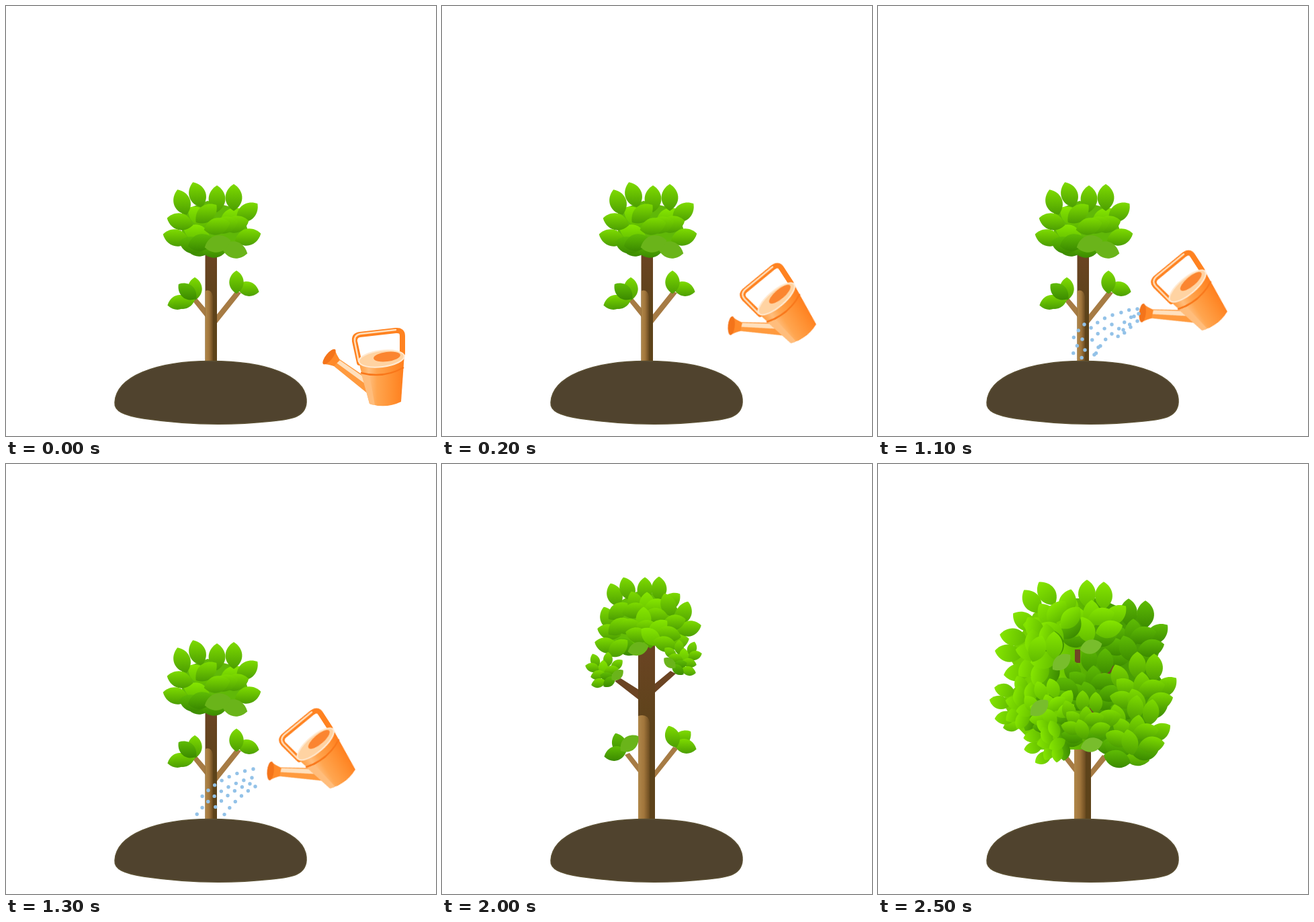
These frames come from a looping animation (640x640 px, 3 s). An HTML page without scripts:

```html
<!DOCTYPE html>
<html lang="en">
<head>
<meta charset="utf-8">
<title>Growing tree</title>
<style>
html,body{margin:0;height:100%;overflow:hidden;background:#fff}
svg{display:block;width:100%;height:100%;--s:1.04}
.leaf{transform:scale(var(--s))}
.g{fill:url(#g)}
.l{fill:url(#l)}
.k{fill:url(#k)}
.f{fill:#6ab41a}
.limb{fill:#a67b44}
.drops{fill:none;stroke:#93c2e8;stroke-width:5.4;stroke-linecap:round;stroke-dasharray:0 12.5}
.can,.show{animation:3s step-end infinite}
.show{opacity:0}
.can{animation-name:can}
.t1{animation-name:t1}
.t2{animation-name:t2}
.t3{animation-name:t3}
.t4{animation-name:t4}
.w1{animation-name:w1}
.w2{animation-name:w2}
.w3{animation-name:w3}
.w4{animation-name:w4}
@keyframes can{
  0%{transform:none;opacity:1}
  6.66%{transform:translate(-257px,300px) rotate(-33deg);opacity:1}
  23.33%{transform:translate(-294px,281px) rotate(-33deg);opacity:1}
  50%,100%{transform:none;opacity:0}
}
@keyframes t1{0%{opacity:1}50%,100%{opacity:0}}
@keyframes t2{0%{opacity:0}50%{opacity:1}66.66%,100%{opacity:0}}
@keyframes t3{0%{opacity:0}66.66%{opacity:1}83.33%,100%{opacity:0}}
@keyframes t4{0%{opacity:0}83.33%,100%{opacity:1}}
@keyframes w1{0%{opacity:0}23.33%{opacity:1}43.33%,100%{opacity:0}}
@keyframes w2{0%{opacity:0}30%{opacity:1}43.33%,100%{opacity:0}}
@keyframes w3{0%{opacity:0}36.66%{opacity:1}43.33%,100%{opacity:0}}
@keyframes w4{0%{opacity:0}43.33%{opacity:1}50%,100%{opacity:0}}
</style>
</head>
<body>
<svg viewBox="0 0 640 640">
<defs>
  <linearGradient id="g" x2="0" y2="1"><stop stop-color="#7edb00"/><stop offset="1" stop-color="#4c9e02"/></linearGradient>
  <linearGradient id="l" x2="0" y2="1"><stop stop-color="#86e600"/><stop offset="1" stop-color="#61bb00"/></linearGradient>
  <linearGradient id="k" x2="0" y2="1"><stop stop-color="#5fbc04"/><stop offset="1" stop-color="#3b8a00"/></linearGradient>
  <linearGradient id="fade"><stop offset=".35" stop-color="#74d000"/><stop offset=".6" stop-color="#489c04"/></linearGradient>
  <linearGradient id="bark"><stop stop-color="#b0874a"/><stop offset=".5" stop-color="#a1763c"/><stop offset="1" stop-color="#6b4b20"/></linearGradient>
  <linearGradient id="shade" x2="0" y2="1"><stop stop-color="#6b4423"/><stop offset=".5" stop-color="#5d431a"/></linearGradient>
  <linearGradient id="tin"><stop stop-color="#ff9a3c"/><stop offset=".22" stop-color="#ffbd7c"/><stop offset=".4" stop-color="#ffa54f"/><stop offset=".75" stop-color="#ff8f30"/><stop offset="1" stop-color="#ff7d1c"/></linearGradient>

  <!-- Leaves leaning left by 0, 20, 50 and 75 degrees; capitals lean right -->
  <path id="a" class="leaf" d="M0-20C14-12 19 8 0 20C-19 8-14-12 0-20Z"/>
  <path id="b" class="leaf" d="M-6.8-18.8C9.1-16.1 20.6 1 6.8 18.8C-15.1 14-17.3-6.5-6.8-18.8Z"/>
  <path id="c" class="leaf" d="M-15.3-12.9C-.2-18.4 18.3-9.4 15.3 12.9C-6.1 19.7-18.2 3-15.3-12.9Z"/>
  <path id="d" class="leaf" d="M-19.3-5.2C-8-16.6 12.6-16.3 19.3 5.2C2.8 20.4-15.2 10.4-19.3-5.2Z"/>
  <use id="B" href="#b" transform="scale(-1 1)"/>
  <use id="C" href="#c" transform="scale(-1 1)"/>
  <use id="D" href="#d" transform="scale(-1 1)"/>

  <g id="tuft" class="g" style="--s:.56">
    <use href="#b" x="228" y="293"/><use href="#a" x="247" y="291"/><use href="#d" x="224" y="303"/>
    <use href="#C" x="260" y="299"/><use href="#a" x="240" y="303" class="l"/><use href="#D" x="252" y="307"/>
    <use href="#D" x="232" y="314"/><use href="#d" x="246" y="317" class="k"/><use href="#D" x="233" y="326"/>
    <use href="#C" x="249" y="324" class="k"/><use href="#C" x="261" y="314" class="f"/>
  </g>

  <g id="bush">
    <use href="#d" x="-27" y="25" class="k"/><use href="#D" x="18" y="24" class="k"/>
    <use href="#b" x="-33" y="-24"/><use href="#a" x="-7" y="-42"/><use href="#a" x="18" y="-39"/>
    <use href="#C" x="35" y="-10"/><use href="#c" x="-22" y="-8"/><use href="#a" x="0" y="-12"/>
    <use href="#D" x="14" y="-8"/><use href="#d" x="-28" y="9"/><use href="#b" x="-8" y="12"/>
    <use href="#D" x="26" y="11"/>
  </g>

  <g id="stem">
    <path fill="url(#shade)" d="M296.500 368h17.500v161h-17.500z"/>
    <path fill="url(#bark)" d="M296.500 424q9-3 11.500 8v97h-11.500z"/>
  </g>
  <g id="trunk">
    <path class="limb" d="M293 460L272 433l7-3 14 18z"/>
    <path fill="url(#shade)" d="M292 268h25v261h-25z"/>
    <path fill="url(#bark)" d="M292 375q15-4 17 10v144h-17z"/>
  </g>
</defs>

<rect width="640" height="640" fill="#fff"/>

<g class="show t1">
  <path class="limb" d="M297 463L277 438l7-3 13 15zM314 472L350 427l-8-3-28 35z"/>
  <use href="#stem"/>
  <path fill="#60b808" d="M262 305L300 290 350 303 362 340 330 366 285 366 262 350Z"/>
  <g class="g" style="--s:1">
    <use href="#d" x="285" y="360" class="k"/><use href="#D" x="312" y="362" class="k"/>
    <use href="#c" x="287" y="313" class="l"/><use href="#C" x="335" y="315" class="l"/><use href="#d" x="284" y="338" class="l"/>
    <use href="#b" x="262" y="292"/><use href="#b" x="285" y="281"/><use href="#a" x="314" y="287"/><use href="#a" x="339" y="285"/>
    <use href="#C" x="359" y="307"/><use href="#d" x="259" y="321"/><use href="#d" x="253" y="345"/><use href="#D" x="360" y="344"/>
    <use href="#D" x="342" y="325"/><use href="#C" x="298" y="309"/>
    <use href="#D" x="326" y="326"/><use href="#D" x="314" y="328"/>
    <use href="#d" x="277" y="356" class="k"/><use href="#D" x="290" y="352" class="k"/>
    <use href="#d" x="340" y="363" class="f"/><use href="#D" x="315" y="354" class="f"/>
  </g>
  <g class="g" style="--s:.86">
    <use href="#a" x="281" y="421"/><use href="#D" x="257" y="441"/><use href="#D" x="265" y="440"/><use href="#c" x="270" y="425" class="k"/>
    <use href="#d" x="360" y="421"/><use href="#a" x="343" y="411"/>
  </g>
</g>

<g class="show t2">
  <path class="limb" d="M297 463L278 438l7-3 12 15zM314 472L343 437l-8-5-21 25z"/>
  <use href="#stem"/>
  <path fill="#60b808" d="M255 322L298 295 345 300 368 338 352 370 324 368 298 374 270 380 250 355Z"/>
  <path fill="#5eb508" d="M228 395L258 385 290 402 282 432 258 446 234 438ZM326 390L360 372 386 396 380 425 355 438 326 420Z"/>
  <g class="g" style="--s:.9">
    <use href="#d" x="280" y="369" class="k"/><use href="#c" x="286" y="352"/><use href="#D" x="334" y="355"/><use href="#d" x="352" y="360"/>
    <use href="#a" x="297" y="282"/><use href="#a" x="317" y="282"/><use href="#b" x="284" y="305"/><use href="#C" x="337" y="303"/>
    <use href="#B" x="361" y="316"/><use href="#c" x="255" y="319"/><use href="#b" x="270" y="319"/><use href="#d" x="244" y="336"/>
    <use href="#D" x="369" y="339"/><use href="#D" x="350" y="341"/><use href="#D" x="256" y="356"/><use href="#b" x="258" y="381"/>
    <use href="#a" x="299" y="312" class="l"/><use href="#D" x="316" y="307"/><use href="#C" x="338" y="325" class="l"/>
    <use href="#D" x="322" y="327"/><use href="#b" x="280" y="334" class="k"/><use href="#a" x="299" y="338" class="k"/>
    <use href="#D" x="283" y="370" class="k"/><use href="#C" x="312" y="352" class="f"/>
  </g>
  <g class="g" style="--s:.85">
    <use href="#c" x="233" y="387"/><use href="#d" x="222" y="405"/><use href="#C" x="254" y="402"/><use href="#d" x="244" y="421" class="l"/>
    <use href="#D" x="232" y="425"/><use href="#d" x="237" y="444"/><use href="#a" x="270" y="404"/><use href="#B" x="285" y="402"/>
    <use href="#C" x="262" y="424"/><use href="#D" x="258" y="441" class="k"/><use href="#C" x="285" y="426" class="f"/>
    <use href="#a" x="325" y="394"/><use href="#b" x="342" y="388"/><use href="#b" x="360" y="370"/><use href="#a" x="379" y="375"/>
    <use href="#b" x="360" y="393"/><use href="#D" x="387" y="398"/><use href="#D" x="371" y="398"/><use href="#D" x="380" y="428"/>
    <use href="#C" x="349" y="417"/><use href="#d" x="371" y="416"/><use href="#a" x="331" y="414" class="k"/><use href="#d" x="358" y="435" class="f"/>
  </g>
</g>

<g class="show t3">
  <path fill="#6b4423" d="M293 351L257 323l9-4 27 17zM317 340l31-28-8-4-23 19z"/>
  <path class="limb" d="M316 468L352 423l-8-2-28 36z"/>
  <use href="#trunk"/>
  <path fill="#64bd06" d="M255 210L290 190 335 195 358 225 366 250 345 272 312 270 275 284 245 265Z"/>
  <g class="g" style="--s:.92">
    <use href="#c" x="274" y="272" class="k"/><use href="#D" x="350" y="265"/><use href="#a" x="310" y="256"/>
    <use href="#b" x="257" y="195"/><use href="#b" x="276" y="186"/><use href="#a" x="302" y="187"/><use href="#a" x="323" y="186"/>
    <use href="#C" x="340" y="205"/><use href="#B" x="360" y="222"/><use href="#b" x="247" y="230"/><use href="#D" x="368" y="245"/>
    <use href="#d" x="249" y="250"/><use href="#d" x="245" y="270"/><use href="#b" x="288" y="207"/><use href="#a" x="305" y="209" class="l"/>
    <use href="#C" x="262" y="219"/><use href="#D" x="286" y="218"/><use href="#D" x="318" y="212" class="l"/><use href="#b" x="337" y="210"/>
    <use href="#d" x="320" y="226"/><use href="#C" x="262" y="242"/><use href="#a" x="300" y="231" class="l"/><use href="#D" x="345" y="236"/>
    <use href="#D" x="277" y="242"/><use href="#d" x="307" y="244"/><use href="#C" x="321" y="245" class="l"/><use href="#d" x="338" y="253"/>
    <use href="#C" x="262" y="274"/><use href="#d" x="291" y="255"/><use href="#c" x="311" y="257" class="l"/>
    <use href="#d" x="332" y="268"/><use href="#D" x="292" y="275" class="f" style="--s:.8"/>
  </g>
  <use href="#tuft"/>
  <use href="#tuft" transform="translate(600 -18) scale(-1 1)"/>
  <g class="g" style="--s:.86">
    <use href="#b" x="264" y="417" class="k"/><use href="#D" x="258" y="431" class="k"/><use href="#C" x="279" y="416" class="f"/>
    <use href="#C" x="357" y="409"/><use href="#d" x="362" y="420"/><use href="#b" x="343" y="406"/>
  </g>
</g>

<g class="show t4">
  <path class="limb" d="M316 468L342 437l-8-4-18 23z"/>
  <use href="#trunk"/>
  <path fill="url(#fade)" d="M232 222L282 200 330 200 392 228 412 260 408 300 428 330 404 372 408 408 368 442 328 425H285L240 425 204 388 184 352 215 322 194 285 215 250Z"/>
  <path fill="none" stroke="#704425" stroke-width="8" d="M312 268l6-32M297 276v20M297 318v18M316 328l38-28M310 370l50-20"/>
  <g class="k">
    <use href="#bush" transform="translate(380 263)"/>
    <use href="#bush" transform="translate(321 331) scale(.95)"/>
    <use href="#d" x="246" y="318"/><use href="#c" x="282" y="333"/><use href="#D" x="268" y="350"/><use href="#d" x="285" y="408"/>
    <use href="#D" x="348" y="420"/>
  </g>
  <g class="g">
    <use href="#d" x="384" y="436"/>
    <use href="#bush" transform="translate(393 342)"/>
    <use href="#bush" transform="translate(384 404) rotate(8) scale(.95)"/>
    <use href="#D" x="342" y="379"/><use href="#d" x="356" y="439" class="k"/>
  </g>
  <g class="l">
    <use href="#bush" transform="translate(318 235)"/>
    <use href="#bush" transform="translate(259 235) rotate(-35)"/>
    <use href="#bush" transform="translate(237 282) rotate(-80)"/>
    <use href="#a" x="262" y="270"/><use href="#B" x="237" y="275"/>
    <use href="#D" x="200" y="389" style="--s:.72"/>
    <use href="#bush" transform="translate(214 358) rotate(-75) scale(.77)"/>
    <use href="#bush" transform="translate(258 366) rotate(-20) scale(.75)"/>
    <use href="#bush" transform="translate(258 413) rotate(-100) scale(.67)"/>
  </g>
  <use href="#bush" class="g" transform="translate(310 386) scale(.78)"/>
  <g fill="#78bd2c" style="--s:.85">
    <use href="#D" x="317" y="272"/><use href="#C" x="273" y="295"/><use href="#C" x="240" y="363"/><use href="#D" x="318" y="418"/>
  </g>
</g>

<path fill="#50432e" stroke="#5b5034" stroke-width="1.500" d="M162 590C164 552 222 528.500 305 528.500S444 550 447 585C449 612 425 615 395 618Q300 628 205 614C175 609 161 603 162 590Z"/>

<g class="can">
  <g fill="none" stroke-linejoin="round" stroke-linecap="round">
    <path stroke="#ff8220" stroke-width="8" d="M526 531L519 499Q518 490 527 489L580 483Q590 482 590 491L590 517"/>
    <path stroke="#ffe0bd" stroke-width="2.5" d="M525 529L519 499Q518 490 527 488L580 482"/>
  </g>
  <path fill="#ff9a3e" d="M541 556L491 522 483 532 541 579Z"/>
  <path fill="#ffe0bd" d="M541 558L492 524 489 529 541 567Z"/>
  <path fill="#ff8a2a" d="M472 533L489 511Q492 519 497 527L488 536Q479 533 472 533Z"/>
  <ellipse cx="481" cy="522" rx="14" ry="5" fill="#f4741a" transform="rotate(-51 481 522)"/>
  <path fill="url(#tin)" d="M525 530L541 592Q565 600 588 589L593 518Z"/>
  <path fill="#ffbd7c" d="M529 548L541 592Q545 594 549 594L541 549Z"/>
  <path fill="none" stroke="#f9771a" stroke-width="2.5" d="M528 546Q562 555 592 538"/>
  <ellipse cx="559" cy="525" rx="34" ry="12" fill="#ffd3a2" stroke="#ffead2" stroke-width="2" transform="rotate(-7 559 525)"/>
  <ellipse cx="567" cy="522" rx="20" ry="7" fill="#fb8530" transform="rotate(-7 567 522)"/>
</g>

<g class="drops">
  <path class="show w1" d="M386 451Q373 451 358 458M388 458Q370 464 358 481M386 469Q368 474 355 495M381 462v1M376 478L365 488"/>
  <path class="show w2" d="M349 460Q330 466 314 482M348 474Q325 485 314 504M348 488Q332 500 322 522"/>
  <path class="show w3" d="M307 474Q295 484 288 500M304 496Q294 506 288 524M328 508L318 526M308 512L303 524"/>
  <path class="show w4" d="M368 454Q318 464 290 497M366 467Q312 482 283 523M363 476Q328 488 304 520M371 480Q345 494 324 523"/>
</g>
</svg>
</body>
</html>
```
